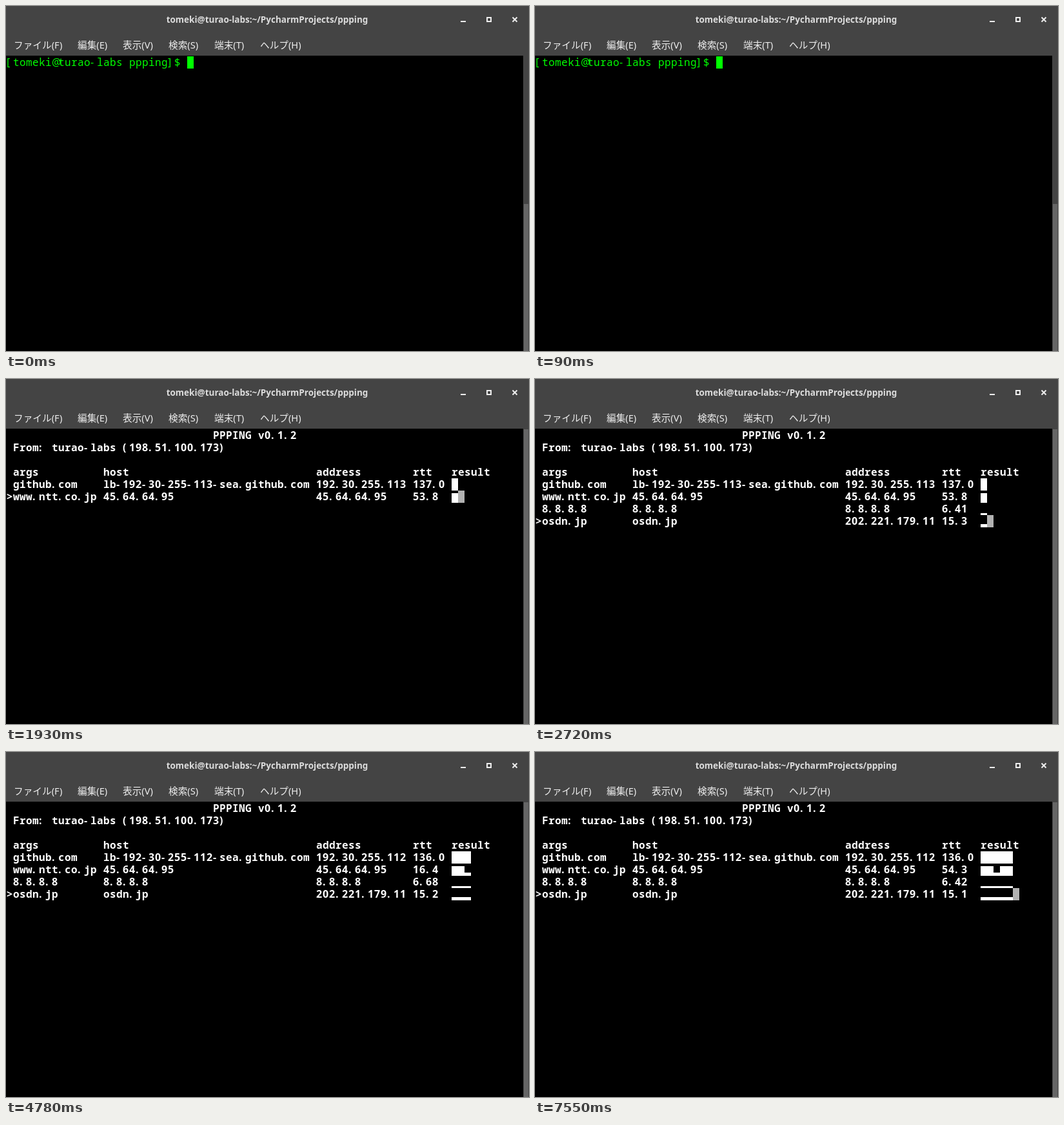
Recreate the animation shown at these times as an HTML page with a canvas. Size 811 by 535 pixels, loop 8000 ms.

```html
<!DOCTYPE html>
<html lang="ja">
<head>
<meta charset="utf-8">
<title>ppping</title>
<style>
  html, body { margin: 0; width: 100%; height: 100%; overflow: hidden; background: #000; }
  canvas { display: block; }
</style>
</head>
<body>
<canvas id="stage" width="811" height="535"></canvas>
<script>
const ctx = document.getElementById('stage').getContext('2d');
const W = 811, H = 535, LOOP = 8000;
const CELL_W = 10, CELL_H = 19, LEFT = 1, TOP = 78;

const USER = 'tomeki', MACHINE = 'turao-labs', MACHINE_IP = '198.51.100.173';
const PROMPT = `[${USER}@${MACHINE} ppping]$ `;
const COMMAND = 'ppping github.com www.ntt.co.jp 8.8.8.8 osdn.jp';
const COLS = { args: 1, host: 15, address: 48, rtt: 63, result: 69 };

const githubNode = n => ({ host: `lb-192-30-255-${n}-sea.github.com`, address: `192.30.255.${n}` });
const fixedNode = (host, address) => () => ({ host, address });
const TARGETS = [
  { args: 'github.com', node: round => githubNode(round < 2 ? 113 : 112),
    rtts: ['137.0', '137.0', '136.0', '135.0', '136.0'] },
  { args: 'www.ntt.co.jp', node: fixedNode('45.64.64.95', '45.64.64.95'),
    rtts: ['53.8', '53.9', '16.4', '55.1', '54.3'] },
  { args: '8.8.8.8', node: fixedNode('8.8.8.8', '8.8.8.8'),
    rtts: ['6.41', '6.23', '6.68', '6.52', '6.42'] },
  { args: 'osdn.jp', node: fixedNode('osdn.jp', '202.221.179.11'),
    rtts: ['15.3', '15.2', '15.2', '15.2', '15.1'] }
];

// [time, number of replies received so far]
const REPLIES = [
  [1930, 2], [2050, 3], [2150, 4],
  [3210, 5], [3280, 6], [3380, 7], [3490, 8],
  [4600, 9], [4640, 10], [4780, 12],
  [5880, 13], [6010, 14], [6050, 15], [6190, 16],
  [7350, 17], [7410, 18], [7480, 19], [7550, 20]
];
// The cursor is visible at first and flips at each of these times.
const BLINKS = [2150, 2720, 3280, 3860, 4460, 5030, 5620, 6300, 6870, 7480];

function rect(x, y, w, h, color) {
  ctx.fillStyle = color;
  ctx.fillRect(x, y, w, h);
}

function label(text, x, y, font, color, align = 'left') {
  ctx.font = font;
  ctx.fillStyle = color;
  ctx.textAlign = align;
  ctx.fillText(text, x, y);
}

// Letters sit on the grid; punctuation is proportional and hugs the left of its cell.
function print(text, col, row, color, weight = 'normal') {
  const y = TOP + row * CELL_H + 15;
  [...text].forEach((ch, i) => {
    const family = /[a-z]/i.test(ch) ? '"Noto Sans Mono", monospace' : '"Noto Sans", sans-serif';
    label(ch, LEFT + (col + i) * CELL_W, y, `${weight} 16px ${family}`, color);
  });
}

function cursor(col, row, color) {
  rect(LEFT + col * CELL_W, TOP + row * CELL_H, CELL_W, CELL_H, color);
}

function drawWindow(thumbTop) {
  rect(0, 0, W, H, '#000');
  rect(0, 0, W, 77, '#444');
  label(`${USER}@${MACHINE}:~/PycharmProjects/ppping`, 405, 26,
    'bold 13.5px "Noto Sans", sans-serif', '#dcdcdc', 'center');

  rect(705, 23, 8, 2, '#eee');
  ctx.strokeStyle = '#eee';
  ctx.lineWidth = 2;
  ctx.strokeRect(746, 18, 6, 6);
  ctx.beginPath();
  ctx.moveTo(785.5, 17.5); ctx.lineTo(792.5, 24.5);
  ctx.moveTo(792.5, 17.5); ctx.lineTo(785.5, 24.5);
  ctx.stroke();

  const menu = { 'ファイル(F)': 12, '編集(E)': 111, '表示(V)': 181, '検索(S)': 252, '端末(T)': 323, 'ヘルプ(H)': 394 };
  for (const [name, x] of Object.entries(menu)) {
    label(name, x, 66, '14.67px "Noto Sans", "Noto Sans CJK JP", sans-serif', '#eee');
  }
  rect(802, 77, 9, H - 77, '#444');
  rect(803, thumbTop, 7, H - thumbTop, '#666');
}

function drawShell(t) {
  drawWindow(307);
  const typed = t < 560 ? '' : t < 1130 ? 'clear' : COMMAND;
  const line = PROMPT + typed;
  print(line, 0, 0, '#0f0');
  if (t < 1520) cursor(line.length, 0, '#0f0');
  else cursor(0, 1, '#0f0');
}

function drawPing(t) {
  drawWindow(78);
  const reply = REPLIES.filter(([time]) => time <= t).pop();
  if (!reply) return cursor(0, 0, '#b2b2b2');

  const put = (text, col, row) => print(text, col, row, '#fff', 'bold');
  put('PPPING v0.1.2', 32, 0);
  put(`From: ${MACHINE} (${MACHINE_IP})`, 1, 1);
  for (const [name, col] of Object.entries(COLS)) put(name, col, 3);

  const last = reply[1] - 1, active = last % TARGETS.length;
  TARGETS.forEach((target, i) => {
    const count = Math.floor((last - i) / TARGETS.length) + 1;
    if (count < 1) return;
    const row = 4 + i;
    const fields = { args: target.args, ...target.node(count - 1), rtt: target.rtts[count - 1] };
    for (const [name, text] of Object.entries(fields)) put(text, COLS[name], row);
    // One eighth of a cell for every started 10 ms.
    target.rtts.slice(0, count).forEach((rtt, n) => {
      const h = Math.ceil(Math.min(8, Math.ceil(rtt / 10)) * CELL_H / 8);
      rect(LEFT + (COLS.result + n) * CELL_W, TOP + (row + 1) * CELL_H - h, CELL_W, h, '#fff');
    });
    if (i === active) {
      put('>', 0, row);
      const flips = BLINKS.filter(time => time <= t).length;
      if (flips % 2 === 0) cursor(COLS.result + count, row, '#b2b2b2');
    }
  });
}

const PARAGRAPH = [
  '図 2.1 は複数の TCP を接続を用いたプログレッシブダウンロードの分割されたブロッ',
  'クの受信の様子を示した例である。複数のブロックを別々の TCP 接続に対して要求を',
  '行う場合，ブロックの再生順番と受信完了順序が一致しない可能性がある. 図 2.1 が示',
  'すように，先頭から連続するブロック 1 及びブロック 2 は再生可能である (有効ブロッ',
  'ク) が，それ以降のブロック.. は未受信のブロックを間に挟んでいるため再生すること',
  'はできない (非有効ブロック). 複数の TCP 接続を束ねることでグッドプットを向上さ',
  'せても，受信ブロックが有効ブロックでない限りは応答性は低下してしまい，ユーザー',
  '体験は悪化することが予想できる. 先行研究ではこの問題への解決作として'
];

function drawParagraph() {
  const left = -9, right = 687;
  ctx.font = '18.2px "Liberation Serif", "Noto Serif CJK JP", "Noto Sans CJK JP", serif';
  ctx.fillStyle = '#000';
  ctx.textAlign = 'left';
  PARAGRAPH.forEach((text, i) => {
    ctx.letterSpacing = '0px';
    const isLast = i === PARAGRAPH.length - 1;
    const gap = isLast ? 0 : (right - left - ctx.measureText(text).width) / (text.length - 1);
    ctx.letterSpacing = `${gap}px`;
    ctx.fillText(text, left, 12.5 + i * 31.6);
  });
  ctx.letterSpacing = '0px';
}

function arrow(x0, y0, x1, y1) {
  ctx.strokeStyle = '#888';
  ctx.lineWidth = 0.7;
  ctx.beginPath();
  ctx.moveTo(x0, y0);
  ctx.lineTo(x1, y1);
  ctx.stroke();
  ctx.save();
  ctx.translate(x1, y1);
  ctx.rotate(Math.atan2(y1 - y0, x1 - x0));
  ctx.fillStyle = '#000';
  ctx.beginPath();
  ctx.moveTo(0, 0);
  ctx.lineTo(-13, -5);
  ctx.lineTo(-13, 5);
  ctx.fill();
  ctx.restore();
}

function drawPaper() {
  rect(0, 0, W, H, '#fff');
  drawParagraph();
  const font = '18.2px "Liberation Sans", Arial, sans-serif';
  label('Receive Blocks', 362.7, 340, font, '#000', 'center');
  label('Head', 73, 496, font, '#000', 'center');
  label('Tail', 667, 496, font, '#000', 'center');
  for (const [x, y] of [[172, 445], [250, 447], [409, 447], [580, 447]]) arrow(365, 352, x, y);

  ctx.strokeStyle = '#000';
  ctx.lineWidth = 1;
  ['#000', '#000', '#fff', '#ddd', '#fff', '#ddd'].forEach((fill, i) => {
    const x = Math.round(122 + i * 86.7), solid = fill === '#000';
    rect(x, 450, 67, 82, fill);
    if (!solid) ctx.strokeRect(x + 0.5, 450.5, 67, 81);
    label(i, x + 33.5, 497, font, solid ? '#fff' : '#000', 'center');
  });
}

function frame(now) {
  const t = now % LOOP;
  if (t >= 50 && t < 90) drawPaper();
  else if (t < 1650) drawShell(t);
  else drawPing(t);
  requestAnimationFrame(frame);
}
requestAnimationFrame(frame);
</script>
</body>
</html>
```
